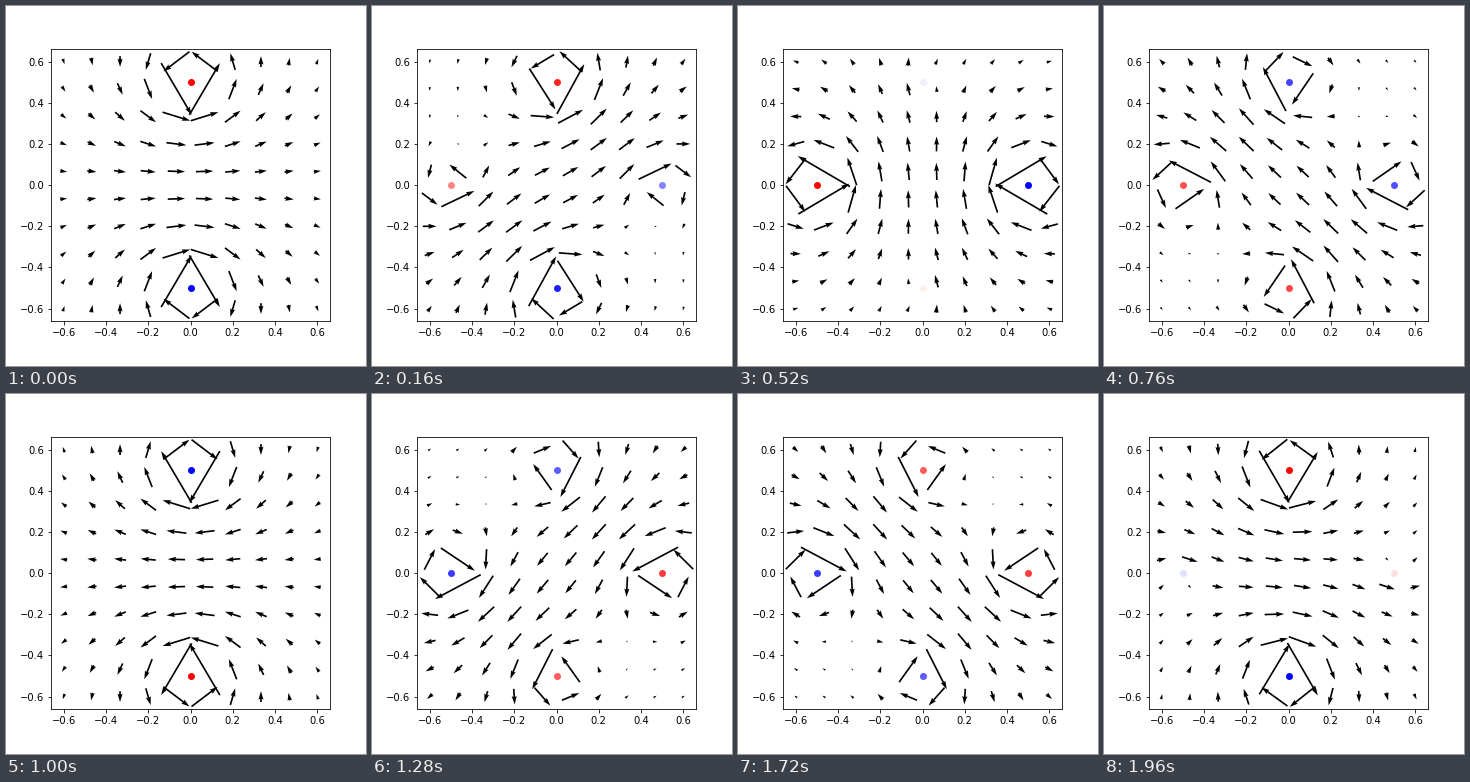
Animation of 360 by 360 pixels, one loop 2 s. Source, as a matplotlib script:

```python
import numpy as np
import matplotlib.pyplot as plt
from matplotlib.animation import FuncAnimation

FRAMES, INTERVAL = 50, 40

# wire positions: top, bottom, left, right
WIRES = [(0, 0.5), (0, -0.5), (-0.5, 0), (0.5, 0)]

axis = np.linspace(-0.6, 0.6, 10)
X, Y = np.meshgrid(axis, axis)


def currents(i):
    """Two opposed pairs of wires, a quarter turn apart in phase."""
    a = 2 * np.pi * i / FRAMES
    return np.cos(a), -np.cos(a), np.sin(a), -np.sin(a)


def field(amps):
    """Sum of the 1/r fields circling each wire."""
    u, v = np.zeros_like(X), np.zeros_like(Y)
    for (wx, wy), amp in zip(WIRES, amps):
        dx, dy = X - wx, Y - wy
        r2 = dx**2 + dy**2
        u -= amp * dy / r2
        v += amp * dx / r2
    return u, v


fig, ax = plt.subplots(figsize=(5, 5), dpi=72)
fig.subplots_adjust(left=0.125, right=0.9, bottom=0.125, top=0.88)

U, V = field(currents(0))
arrows = ax.quiver(X, Y, U, V, pivot="mid", width=0.006,
                   scale=18 * np.hypot(U, V).mean())
dots = [ax.plot(x, y, "o", ms=7, mew=0)[0] for x, y in WIRES]
ax.set_xlim(-0.66, 0.66)
ax.set_ylim(-0.66, 0.66)


def update(i):
    amps = currents(i)
    arrows.set_UVC(*field(amps))
    for dot, amp in zip(dots, amps):
        dot.set_color("red" if amp > 0 else "blue")
        dot.set_alpha(min(1, abs(amp)))
    return [arrows, *dots]


anim = FuncAnimation(fig, update, frames=FRAMES, interval=INTERVAL,
                     init_func=lambda: update(0), repeat=True, repeat_delay=0)
plt.show()
```
